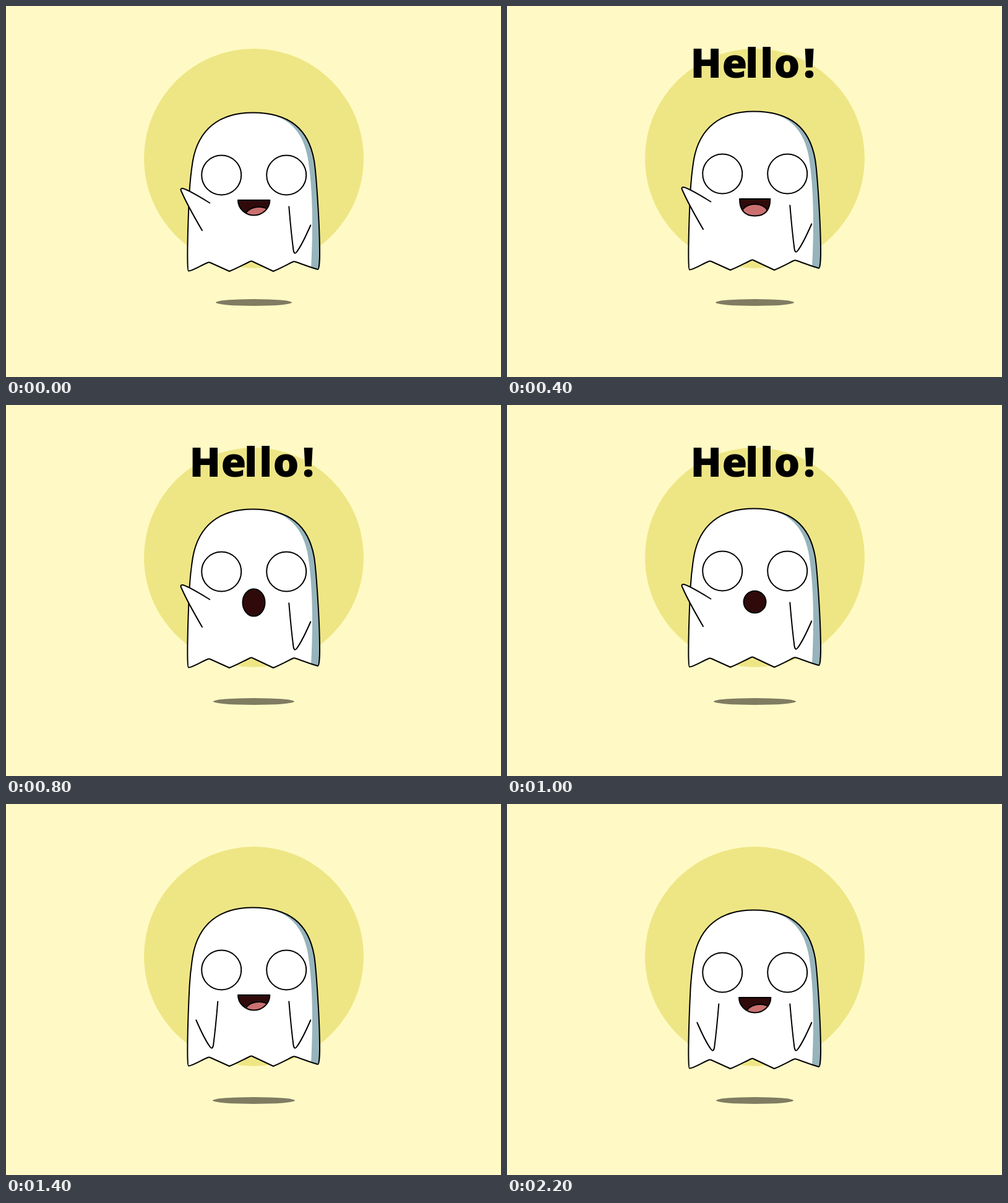
An HTML page that plays this animation: 800 by 600 pixels, repeating every 2.4 s.

```html
<!DOCTYPE html>
<html lang="en">
<head>
<meta charset="utf-8">
<title>Hello ghost</title>
<style>
  html, body { margin: 0; width: 100%; height: 100%; overflow: hidden; background: #fffac5; }
  svg { display: block; width: 800px; height: 600px; }
  .ink { stroke: #000; stroke-width: 2; stroke-linecap: round; stroke-linejoin: round; }
  text { font: 800 66px "Open Sans", "Noto Sans", sans-serif; }
</style>
</head>
<body>
<svg viewBox="0 0 800 600">
  <defs>
    <path id="body" d="M295 428.5 C292 428.5 293.5 360 296.5 300 C298 276 300 262 302 250
      C311 200 344 172.5 399 172.5 C458 172.5 489 199 498 250 C501 268 507 350 507 400
      C507 412 506 426 504 426 C492 423 478 417 467 413.5 Q465 413 463 414
      C453 419 442 425 432 429 L398 413 Q396.5 412 395 413
      C384 418 372 425 361 429 L330 415 Q328 414 326 415 C316 419 301 428.5 295 428.5 Z"/>
    <path id="arm" d="M457.3 324.5 C459 345 462 376 464.5 395 Q466 403 470 397.5 C477 388 486 369 492.3 354.5"/>
    <clipPath id="inBody"><use href="#body"/></clipPath>
    <clipPath id="inMouth"><path class="lips"/></clipPath>
  </defs>

  <rect width="800" height="600" fill="#fffac5"/>
  <circle cx="400.5" cy="246.5" r="177.5" fill="#eee685"/>
  <ellipse id="shadow" cx="400.5" cy="479.5" rx="61.5" ry="5.5" fill="#807c62"/>

  <g id="ghost">
    <use href="#body" fill="#fff"/>
    <path clip-path="url(#inBody)" fill="#96b4bc"
      d="M425 175 C462 183 480 208 487 242 C495 285 497 350 493 424 L520 440 V160 H425 Z"/>
    <use href="#body" class="ink" fill="none"/>
    <g class="ink" fill="#fff">
      <circle cx="348.2" cy="273.5" r="32"/>
      <circle cx="453.2" cy="273.5" r="32"/>
      <use href="#arm"/>
      <use id="armDown" href="#arm" transform="matrix(-1 0 0 1 799.6 0)"/>
      <path id="armUp" d="M329.3 318.5 C312 308 296 298 286.5 295.3 Q280 294 284 301 C290 315 303 339 317 363"/>
    </g>
    <path class="lips" fill="#300a0a"/>
    <ellipse id="tongue" class="ink" fill="#cb7070" clip-path="url(#inMouth)"/>
    <path class="lips ink" fill="none"/>
  </g>

  <text id="hello" x="296.5 347.5 385 409 431.5 479" y="116">Hello!</text>
</svg>
<script>
const LOOP = 2400, STEP = 100, BEAT = 200;
const WAVE_END = 1300, TEXT_START = 400;
const $ = id => document.getElementById(id);
const lips = document.querySelectorAll('.lips');

const round = ry => `M382.5 323.5 A18 ${ry} 0 0 1 418.5 323.5 A18 ${ry} 0 0 1 382.5 323.5 Z`;

// tongue: cx, cy, rx, ry
const smile = { d: 'M375 314 H426.3 A25.65 24.5 0 0 1 375 314 Z', tongue: [409, 341, 23, 16] };
const wide = {
  d: 'M376 314 H425.3 C425.3 332 417 341.5 400.6 341.5 C384 341.5 376 332 376 314 Z',
  tongue: [400.6, 337, 21, 14.5]
};
const narrow = {
  d: 'M379 314 C387 310 414 310 422 314 C423 332 415 343 400.6 343 C386 343 378 332 379 314 Z',
  tongue: [400.6, 341, 17, 12]
};
const tall = { d: round(22) };
const small = { d: round(17.8) };
const speech = [[0, smile], [400, wide], [700, narrow], [800, tall], [900, small], [WAVE_END, smile]];

const show = (id, on) => $(id).setAttribute('visibility', on ? 'visible' : 'hidden');

function setMouth({ d, tongue }) {
  lips.forEach(p => p.setAttribute('d', d));
  show('tongue', tongue);
  if (tongue) ['cx', 'cy', 'rx', 'ry'].forEach((k, i) => $('tongue').setAttribute(k, tongue[i]));
}

function draw(ms) {
  const t = Math.floor((ms % LOOP) / STEP) * STEP;
  const lift = 6 - Math.abs(6 - Math.floor(t / BEAT));
  const waving = t < WAVE_END;
  $('ghost').setAttribute('transform', `translate(0 ${-lift})`);
  $('shadow').setAttribute('rx', 61.5 + lift);
  show('armUp', waving);
  show('armDown', !waving);
  show('hello', waving && t >= TEXT_START);
  setMouth(speech.filter(([from]) => t >= from).pop()[1]);
}

const start = performance.now();
function tick() {
  draw(performance.now() - start);
  requestAnimationFrame(tick);
}
tick();
</script>
</body>
</html>
```
